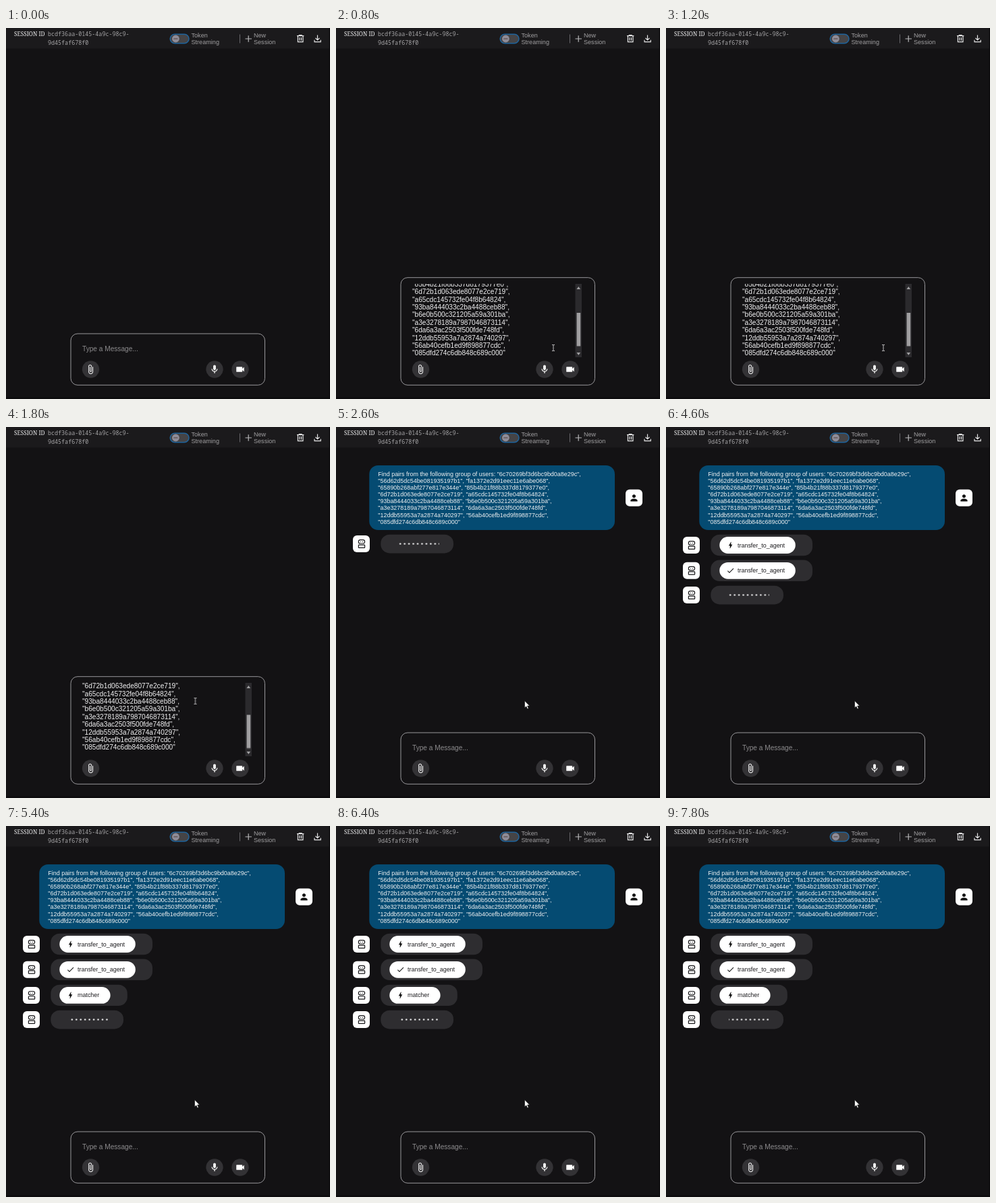
An HTML page that plays this animation: 480x551 px, repeating every 8 s.

```html
<!DOCTYPE html>
<html lang="en">
<head>
<meta charset="utf-8">
<title>Agent chat</title>
<style>
  html, body { margin: 0; width: 100%; height: 100%; overflow: hidden; background: #131214; }
  svg { display: block; }
  #stage { width: 100vw; height: 100vh; }
  text { font-family: "Liberation Sans", Arial, sans-serif; white-space: pre; }
  .label { font-size: 9.1px; fill: #a09fa1; }
  .small { font-size: 8.95px; }
  .large { font-size: 10.15px; }
  .white { fill: #f1f1f2; }
  .line { fill: none; stroke: #e6e6e7; stroke-width: 1.2; }
  .pill { fill: #2e2d30; }
  .frame { fill: #131214; stroke: #98979a; stroke-width: 1; }

  .timed { animation: 8s step-end infinite; }
  #idle { animation-name: idle; }
  #editor { animation-name: editing; }
  #typed { animation-name: scrollText; }
  #thumb { animation-name: scrollThumb; }
  #beam { animation-name: beam; }
  #sent { animation-name: sent; }
  #calls { animation-name: calls; }
  #matcher { animation-name: matcher; }
  #loader { animation-name: loader; }
  #dots { animation: flow 1s steps(5) infinite; }

  @keyframes idle { 0% { visibility: visible } 5% { visibility: hidden } 27.5%, 100% { visibility: visible } }
  @keyframes editing { 0% { visibility: hidden } 5% { visibility: visible } 27.5%, 100% { visibility: hidden } }
  @keyframes sent { 0% { visibility: hidden } 27.5%, 100% { visibility: visible } }
  @keyframes calls { 0% { visibility: hidden } 50%, 100% { visibility: visible } }
  @keyframes matcher { 0% { visibility: hidden } 67.5%, 100% { visibility: visible } }
  @keyframes scrollText { 0% { transform: none } 20%, 100% { transform: translateY(-6.8px) } }
  @keyframes scrollThumb { 0% { transform: none } 20%, 100% { transform: translateY(4.5px) } }
  @keyframes beam {
    0% { transform: translate(322px, 475px) }
    17.5% { transform: translate(309px, 454px) }
    20% { transform: translate(291px, 425px) }
    22.5%, 100% { transform: translate(280.5px, 407px) }
  }
  @keyframes loader { 0% { transform: none } 50% { transform: translateY(76px) } 67.5%, 100% { transform: translateY(114px) } }
  @keyframes flow { to { transform: translateX(-12.9px) } }
</style>
</head>
<body>
<svg id="stage" viewBox="0 0 480 551" preserveAspectRatio="none">
  <defs>
    <path id="clip" d="M16.5 6v11.5c0 2.21-1.79 4-4 4s-4-1.79-4-4V5c0-1.38 1.12-2.5 2.5-2.5s2.5 1.12 2.5 2.5v10.5c0 .55-.45 1-1 1s-1-.45-1-1V6H10v9.5c0 1.38 1.12 2.5 2.5 2.5s2.5-1.12 2.5-2.5V5c0-2.21-1.79-4-4-4S7 2.79 7 5v12.5c0 3.04 2.46 5.5 5.5 5.5s5.5-2.46 5.5-5.5V6z"/>
    <path id="mic" d="M12 14c1.66 0 3-1.34 3-3V5c0-1.66-1.34-3-3-3S9 3.34 9 5v6c0 1.66 1.34 3 3 3zm5.3-3c0 3-2.54 5.1-5.3 5.1S6.7 14 6.7 11H5c0 3.41 2.72 6.23 6 6.72V21h2v-3.28c3.28-.48 6-3.3 6-6.72z"/>
    <path id="camera" d="M17 10.5V7c0-.55-.45-1-1-1H4c-.55 0-1 .45-1 1v10c0 .55.45 1 1 1h12c.55 0 1-.45 1-1v-3.5l4 4v-11z"/>
    <path id="person" d="M12 12c2.21 0 4-1.79 4-4s-1.79-4-4-4-4 1.79-4 4 1.79 4 4 4zm0 2c-2.67 0-8 1.34-8 4v2h16v-2c0-2.66-5.33-4-8-4z"/>
    <path id="bolt" d="M11 21h-1l1-7H7.5c-.58 0-.57-.32-.38-.66C8.5 10.9 10.4 7.5 13 3h1l-1 7h3.5c.5 0 .56.33.47.51C13 17.5 11 21 11 21z"/>
    <path id="check" d="M9 16.17 4.83 12l-1.42 1.41L9 19 21 7l-1.41-1.41z"/>
    <g id="robot">
      <rect x="25" y="-12.5" width="25" height="25" rx="6" fill="#fff"/>
      <g fill="none" stroke="#18181a" stroke-width="1.2">
        <rect x="33.4" y="-5.9" width="9.2" height="5.4" rx="2.6"/>
        <rect x="33.4" y="1.6" width="9.2" height="4.2" rx=".6"/>
        <path d="M36.2-3.2h.9M39-3.2h.9" stroke-width="1.3"/>
      </g>
    </g>
  </defs>

  <rect width="480" height="551" fill="#131214"/>
  <rect width="480" height="30.5" fill="#1b1a1c"/>

  <text x="12" y="12" class="white" style="font: 8.3px 'Noto Serif', serif">SESSION ID</text>
  <g fill="#a5a4a6" style="font-size: 8.38px">
    <text x="62" y="12.3" style="font-family: 'Noto Sans Mono', monospace">bcdf36aa-0145-4a9c-98c9-</text>
    <text x="62" y="25" style="font-family: 'Noto Sans Mono', monospace">9d45faf678f0</text>
  </g>
  <rect x="243.2" y="9.2" width="27.8" height="13.6" rx="6.8" fill="#454446" stroke="#20649c" stroke-width="1.5"/>
  <circle cx="251.4" cy="16" r="5.4" fill="#8f8c98"/>
  <path d="M248.4 16h6" stroke="#5a4c48" stroke-width="1.2"/>
  <g class="label">
    <text x="274.5" y="14">Token</text>
    <text x="274.5" y="24">Streaming</text>
    <text x="367" y="14">New</text>
    <text x="367" y="24">Session</text>
  </g>
  <path d="M346.5 9.5v13" stroke="#6a696c"/>
  <path class="line" d="M354.5 16h9.5M359.2 11.2v9.6" style="stroke: #b8b7b9"/>
  <path class="line" d="M431 11.7h10.4M434.3 11.2v-.7h3.8v.7M432.4 12v8.7h7.6V12M434.9 13.9v4.8M437.5 13.9v4.8"/>
  <path class="line" d="M461.5 10.5v7M458.5 14.8l3 3 3-3M457 17.8v2.8h9.2v-2.8"/>

  <g id="idle" class="timed">
    <rect class="frame" x="96" y="454" width="287.5" height="76.3" rx="10"/>
    <text x="113" y="479.6" class="large" fill="#8c8b8d">Type a Message...</text>
  </g>

  <g id="editor" class="timed">
    <rect class="frame" x="96" y="370.7" width="287.5" height="159.6" rx="10"/>
    <svg x="112" y="380" width="242" height="109"><g id="typed" class="timed large white"></g></svg>
    <rect x="354.5" y="380" width="9.5" height="109" fill="#2b2a2d"/>
    <path d="M356.5 388l2.8-4 2.8 4zM356.5 482l2.8 4 2.8-4z" fill="#a09fa1"/>
    <rect id="thumb" class="timed" x="356.6" y="423" width="5.6" height="49.5" fill="#a09fa1"/>
    <path id="beam" class="timed" d="M-2-4.5h1.5l.5.5.5-.5h1.5M0-4v8M-2 4.5h1.5l.5-.5.5.5h1.5" fill="none" stroke="#d8d8d9" stroke-width=".9"/>
  </g>

  <g fill="#333235">
    <circle cx="125.5" cy="507" r="12.7"/>
    <circle cx="309" cy="507" r="12.7"/>
    <circle cx="347" cy="507" r="12.7"/>
  </g>
  <g fill="#fff">
    <use href="#clip" transform="translate(117.6 499.3) scale(.64)"/>
    <use href="#mic" transform="translate(301.3 499.3) scale(.64)"/>
    <use href="#camera" transform="translate(339.3 499.3) scale(.64)"/>
  </g>

  <g id="sent" class="timed">
    <rect x="49.3" y="57" width="363.7" height="96" rx="13" fill="#054b72"/>
    <g id="message" class="small white"></g>
    <rect x="429" y="92.8" width="25" height="25" rx="6" fill="#fff"/>
    <use href="#person" transform="translate(433.8 97.6) scale(.64)" fill="#111"/>
    <g id="loader" class="timed">
      <use href="#robot" y="173.5"/>
      <rect class="pill" x="66.3" y="159.8" width="107.7" height="27.6" rx="13"/>
      <svg x="93" y="170" width="59.7" height="7" viewBox="93 170 59.7 7">
        <path id="dots" d="M90.04 173.5H175" stroke="#e4e4e5" stroke-width="2.7" stroke-linecap="round" stroke-dasharray="0 6.45"/>
      </svg>
    </g>
    <path d="M279.4 406.6v10.6l2.4-2.2 1.7 3.7 1.8-.8-1.7-3.6h3.3z" fill="#fff" stroke="#0a0a0a" stroke-width=".7"/>
  </g>
  <g id="calls" class="timed"></g>
  <g id="matcher" class="timed"></g>

  <path d="M479.5 0v551M0 549.5h480" stroke="#0a090b" stroke-width="1.5"/>
</svg>

<script>
  const ids = [
    "6c70269bf3d6bc9bd0a8e29c", "56d62d5dc54be081935197b1", "fa1372e2d91eec11e6abe068",
    "65890b268abf277e817e344e", "85b4b21f88b337d8179377e0", "6d72b1d063ede8077e2ce719",
    "a65cdc145732fe04f8b64824", "93ba8444033c2ba4488ceb88", "b6e0b500c321205a59a301ba",
    "a3e3278189a7987046873114", "6da6a3ac2503f500fde748fd", "12ddb55953a7a2874a740297",
    "56ab40cefb1ed9f898877cdc", "085dfd274c6db848c689c000"
  ];
  const quoted = ids.map((id, i) => `"${id}"` + (i < ids.length - 1 ? "," : ""));
  const byId = id => document.getElementById(id);
  const rows = (lines, x, y, pitch) =>
    lines.map((s, i) => `<text x="${x}" y="${y + i * pitch}">${s}</text>`).join("");

  // The last typed line rests at a fixed baseline; earlier ones run upwards.
  const pitch = 11.4;
  byId("typed").innerHTML = rows(quoted, 1, 106.3 - (ids.length - 1) * pitch, pitch);

  const wrapped = ["Find pairs from the following group of users: " + quoted[0]];
  for (let i = 1; i < quoted.length; i += 2) wrapped.push(quoted.slice(i, i + 2).join(" "));
  byId("message").innerHTML = rows(wrapped, 62.3, 73.1, 10.07);

  const call = (y, icon, name, width) => `
    <use href="#robot" y="${y}"/>
    <rect class="pill" x="66.3" y="${y - 15.7}" width="${width + 38.2}" height="31.4" rx="13"/>
    <rect x="79.3" y="${y - 12.4}" width="${width}" height="24.8" rx="12.4" fill="#fff"/>
    <use href="#${icon}" transform="translate(89.2 ${y - 6.4}) scale(.53)" fill="#111"/>
    <text x="106" y="${y + 3}" class="small" fill="#1c1b1e">${name}</text>`;
  byId("calls").innerHTML =
    call(175.5, "bolt", "transfer_to_agent", 112.5) + call(213.3, "check", "transfer_to_agent", 112.5);
  byId("matcher").innerHTML = call(251.4, "bolt", "matcher", 75.3);
</script>
</body>
</html>
```
